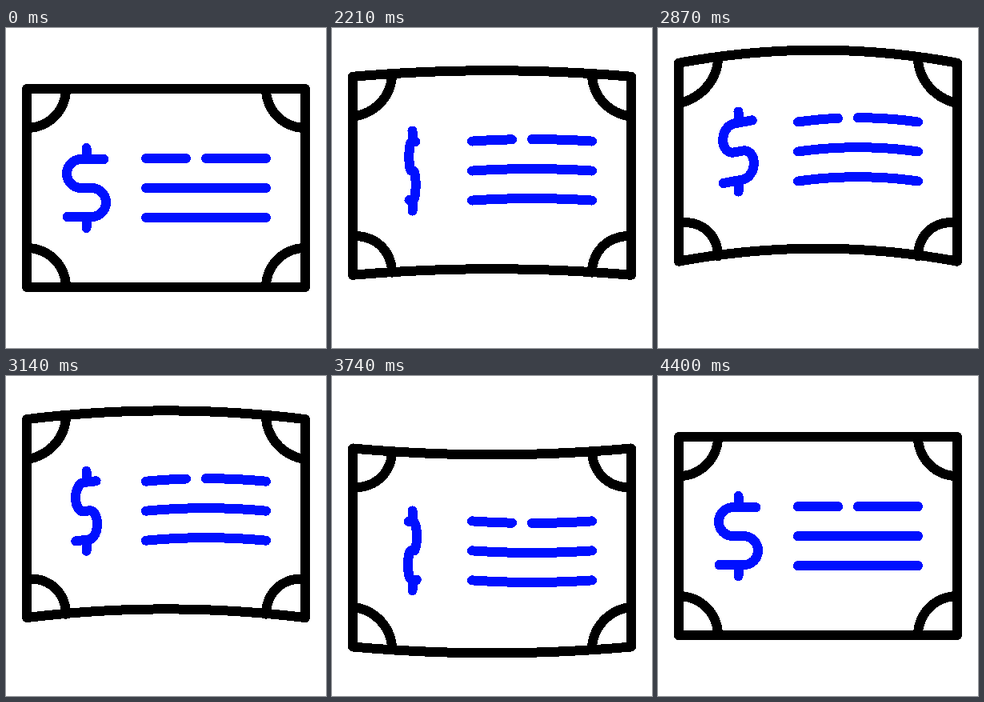
An HTML page that plays this animation: 400 px wide and 400 px high, repeating every 4430 ms.

```html
<!DOCTYPE html>
<html lang="en">
<head>
<meta charset="utf-8">
<title>Waving bill</title>
<style>
  html, body { margin: 0; width: 100%; height: 100%; overflow: hidden; background: #fff; }
  svg { display: block; width: 100%; height: 100%; }
  path {
    fill: none; stroke-width: 12; stroke-linecap: round; stroke-linejoin: round;
    shape-rendering: crispEdges;
  }
</style>
</head>
<body>
<svg viewBox="0 0 400 400">
  <path id="border" stroke="#000"/>
  <path id="corners" stroke="#000"/>
  <path id="text" stroke="#0010ff"/>
  <path id="dollar" stroke="#0010ff"/>
</svg>
<script>
const LOOP = 4430, START = 2030, STEP = 30;

// Bezier easing from time a to b, with control points (x1, 0) and (x2, 1)
function ease(t, a, b, x1, x2) {
  const u = Math.min(1, Math.max(0, (t - a) / (b - a)));
  if (u === 0 || u === 1) return u;
  let lo = 0, hi = 1, s;
  for (let i = 0; i < 24; i++) {
    s = (lo + hi) / 2;
    const x = 3 * s * (1 - s) * ((1 - s) * x1 + s * x2) + s ** 3;
    if (x < u) lo = s; else hi = s;
  }
  return s * s * (3 - 2 * s);
}

// The bill swings up to a peak, down to a dip and back to rest
function pose(t) {
  const up = ease(t, START, 2720, .2, .2);
  const down = ease(t, 2870, 3790, .33, .62);
  const back = ease(t, 3790, LOOP, .33, .67);
  const swing = (peak, dip) => peak * up + (dip - peak) * down - dip * back;

  const spin = Math.max(0, t - START + STEP);
  const turn = Math.min(720, .386 * spin - .000018 * spin ** 2);
  return {
    mid: swing(-48.3, 22.8),
    bend: swing(-16, 8),
    lift: swing(-45.5, 18.8),
    flip: Math.cos(turn * Math.PI / 180)
  };
}

const sample = (f, n = 32) => Array.from({ length: n + 1 }, (_, i) => f(i / n));

const line = (x1, x2, y) => sample(u => [x1 + (x2 - x1) * u, y]);

const arc = (cx, cy, r, from, sweep) => sample(u => {
  const a = (from + sweep * u) * Math.PI / 180;
  return [cx + r * Math.cos(a), cy + r * Math.sin(a)];
});

const L = 26, R = 374, T = 76, B = 324, AXIS = 100.5;
const border = [[...line(L, R, T), ...line(R, L, B), [L, T]]];
const corners = [[L, T], [R, T], [R, B], [L, B]].map(([x, y], i) => arc(x, y, 49, 90 * i, 90));
const text = [line(175, 225, 163), line(250, 325, 163), line(175, 325, 200), line(175, 325, 237)];
const dollar = [
  [[AXIS, 150], [AXIS, 163]],
  [[AXIS, 237], [AXIS, 250]],
  [[122.5, 164], ...arc(94, 182, 18, -90, -180), ...arc(107, 218, 18, -90, 180), [76.5, 236]]
];

function draw(id, shapes, warp) {
  const d = shapes.map(s => 'M' + s.map(p => warp(...p).map(v => v.toFixed(2)).join(' ')).join('L'));
  document.getElementById(id).setAttribute('d', d.join(''));
}

function render(time) {
  const t = START + Math.floor((time - START) / STEP) * STEP;
  const { mid, bend, lift, flip } = pose(time < START ? 0 : t);
  const sag = (x, centre, half) => bend * ((x - centre) / half) ** 2;

  draw('border', border, (x, y) => [x, y + mid - sag(x, 200, 174)]);
  draw('corners', corners, (x, y) => [x, y + mid - sag(x, 200, 174) - .08 * bend]);
  draw('text', text, (x, y) => [x, y + lift + .33 * (bend - sag(x, 250, 75))]);
  draw('dollar', dollar, (x, y) => {
    const dx = (x - AXIS) * flip;
    return [AXIS + dx, y + lift + dx * bend * .0115];
  });
}

function tick() {
  render(performance.now() % LOOP);
  requestAnimationFrame(tick);
}
tick();
</script>
</body>
</html>
```
